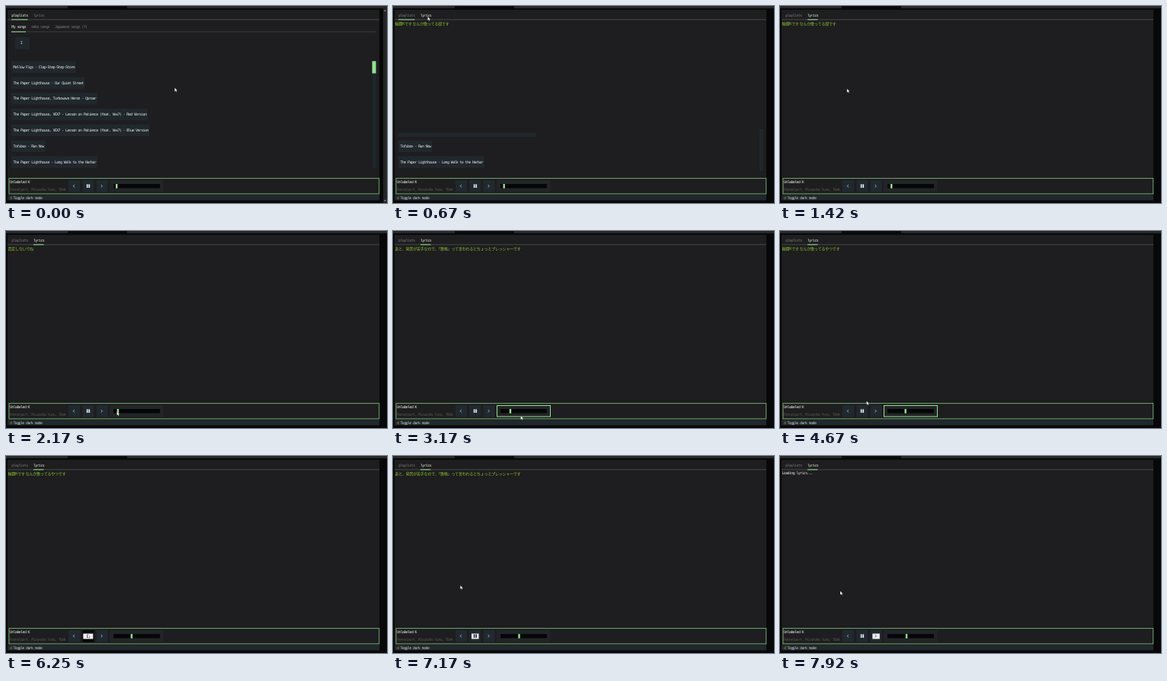
Write an HTML page with a canvas that moves like this. It is 500 px wide and 259 px high and loops after 8 s.

```html
<!DOCTYPE html>
<html lang="en">
<head>
<meta charset="utf-8">
<title>Terminal music player</title>
<style>
html, body { margin: 0; width: 100%; height: 100%; overflow: hidden; background: #080808; }
canvas { display: block; }
</style>
</head>
<body>
<canvas id="stage" width="500" height="259"></canvas>
<script>
const ctx = document.getElementById('stage').getContext('2d');
const LOOP = 8000, FRAME = 1000 / 12;
const BG = '#1e1d1f', BOX = '#20282d', GREEN = '#8ee58e', WHITE = '#e8e8e8', GRAY = '#77777a';
const CELL = 2.36;

// Moments of user actions, in ms
const OPEN_LYRICS = 660, FOCUS_SLIDER = 2250, PAUSE = 4900, RESUME = 6330, NEXT = 7410;

const BAND = 'The Paper Lighthouse';
const SONGS = [
  'Mellow Figs - Clap-Step-Step-Storm',
  BAND + ' - Our Quiet Street',
  BAND + ', Turbowave Heron - Uproar',
  BAND + ', VEX7 - Lesson on Patience (feat. Vex7) - Red Version',
  BAND + ', VEX7 - Lesson on Patience (feat. Vex7) - Blue Version',
  'Tofubox - Run Now',
  BAND + ' - Long Walk to the Harbor',
];

const INTRO = '無題Kです なんか歌ってるやつです';
const PRESSURE = 'あと、発音が苦手なので、「歌唱」って言われるとちょっとプレッシャーです';
const LYRICS = [
  [0, '無題Kです なんか歌ってる奴です'], [1920, '否定しないでね'],
  [2920, PRESSURE], [3750, INTRO], [RESUME, PRESSURE], [NEXT, 'Loading lyrics...'],
];

const SPOT = {
  list: [221.3, 107.5], lyricsTab: [45.5, 14], slider: [145.5, 237.5], belowSlider: [167.5, 243],
  abovePause: [113.5, 223.5], pause: [107, 234], next: [125, 235], rest: [79, 177.5],
};
// Pointer trips; "bow" bends the path sideways at its middle.
const TRIPS = [
  { from: 80, to: 500, goal: SPOT.lyricsTab },
  { from: 1080, to: 1830, goal: SPOT.slider },
  { from: 2420, to: 2580, goal: SPOT.belowSlider },
  { from: 3750, to: 4500, goal: SPOT.abovePause, bow: [150, 8] },
  { from: 4670, to: PAUSE, goal: SPOT.pause },
  { from: 5420, to: 6170, goal: SPOT.pause, bow: [-95, -208] },
  { from: 6500, to: 7330, goal: SPOT.next, bow: [-112, -208] },
  { from: 7420, to: 7830, goal: SPOT.rest },
];

const clamp = (v, lo, hi) => Math.min(hi, Math.max(lo, v));
const progress = (t, from, to) => clamp((t - from) / (to - from), 0, 1);
const ease = p => p * p * (3 - 2 * p);

function pointerAt(t) {
  return TRIPS.reduce((pos, { from, to, goal, bow = [0, 0] }) => {
    const p = ease(progress(t, from, to));
    return pos.map((v, i) => v + (goal[i] - v) * p + bow[i] * Math.sin(Math.PI * p));
  }, SPOT.list);
}

// The thumb creeps while playing and jumps with each seek step.
function thumbAt(t) {
  const played = t - clamp(t - PAUSE, 0, RESUME - PAUSE);
  const steps = (t >= 2490 ? 2 : 0) + clamp(Math.floor((t - 3080) / 170), 0, 3);
  return 144 + played * .00075 + steps * 3.2;
}

function rect(x, y, w, h, color) {
  ctx.fillStyle = color;
  ctx.fillRect(x, y, w, h);
}

function outline(x, y, w, h, color) {
  ctx.strokeStyle = color;
  ctx.lineWidth = 1;
  ctx.strokeRect(x, y, w, h);
}

function path(points) {
  ctx.beginPath();
  points.forEach(([x, y]) => ctx.lineTo(x, y));
}

function poly(points, color) {
  path(points);
  ctx.fillStyle = color;
  ctx.fill();
}

function label(text, x, y, color = WHITE) {
  const wide = /[^\x00-\x7f]/.test(text);
  ctx.font = wide ? '5px "Noto Sans CJK JP", "Noto Sans CJK", sans-serif' : '5px "DejaVu Sans Mono", monospace';
  ctx.letterSpacing = wide ? '-0.2px' : `${CELL - 5 * .602}px`;
  ctx.fillStyle = color;
  ctx.fillText(text, x, y);
}

function drawChrome(t) {
  rect(0, 0, 500, 259, '#080808');
  rect(0, 0, 500, 3, '#29292b');
  rect(81, 0, 78, 3, '#0b0b0c');
  rect(2, 5, 488, 250, BG);
  rect(2, 248.5, 488, 7, BOX);
  label('d', 5, 252.4, '#b58a35');
  label('Toggle dark mode', 9.5, 252.4, '#c4c8ca');
  if (t < 160) {
    rect(495, 3, 5, 256, '#252525');
    poly([[496, 7], [497.5, 5], [499, 7]], '#8a8a8a');
    poly([[496, 255], [497.5, 257], [499, 255]], '#8a8a8a');
  }
}

function drawTabs(t) {
  const onLyrics = t >= OPEN_LYRICS;
  label('playlists', 7.3, 12.7, onLyrics ? GRAY : WHITE);
  label('lyrics', 36, 12.7, onLyrics ? WHITE : GRAY);
  rect(2, 17.4, 488, 1, '#48494b');
  const p = progress(t, 670, 820);
  rect(7 + 29 * p, 17.4, 21.5 - 8 * p, 1, GREEN);
}

function drawPlaylists() {
  label('My songs', 7.3, 28.2);
  label('neko songs', 33.3, 28.2, GRAY);
  label('Japanese songs (?)', 64, 28.2, GRAY);
  rect(7, 33.4, 479, 1, '#3c3d3f');
  rect(7, 33.4, 19, 1, GREEN);
  rect(12, 41, 19, 16, BOX);
  label('I', 18.7, 49);
  drawSongs();
  rect(481, 73, 5, 140, '#1f272c');
  rect(480.5, 72.5, 5, 16, GREEN);
}

function drawSongs() {
  SONGS.forEach((song, i) => {
    const y = 72.5 + i * 20.8;
    rect(7, y, song.length * CELL + 4.3, 15.5, BOX);
    label(song, 9.6, y + 8);
  });
}

// The list is wiped from the top while the lyrics page opens.
function drawLeftovers(t) {
  const top = t < 740 ? 173 : 196;
  ctx.save();
  ctx.beginPath();
  ctx.rect(2, top, 488, 50);
  ctx.clip();
  drawSongs();
  ctx.restore();
  if (t < 740) rect(7, 166.5, 181, 5.5, BOX);
  rect(481, top - 11, 5, 228 - top, '#20272b');
}

function drawLyrics(t) {
  const line = LYRICS.filter(l => l[0] <= t).pop()[1];
  label(line, 2.5, 22.8, t >= NEXT ? WHITE : '#8fc92b');
}

function drawChevron(x, y, dir, color) {
  path([[x - dir, y - 1.8], [x + dir * .8, y], [x - dir, y + 1.8]]);
  ctx.strokeStyle = color;
  ctx.lineWidth = .8;
  ctx.stroke();
}

function drawButton(x, icon, focused) {
  const playing = icon !== 'play';
  rect(x, 229, 15, 15.5, playing ? '#20292f' : '#060708');
  const c = x + 7.5, ink = focused ? '#303438' : WHITE;
  if (focused) {
    const w = playing ? 9.5 : 13;
    rect(c - w / 2, 233.5, w, 7, '#f0f0f0');
  }
  if (icon === 'pause') {
    rect(c - 2, 234.3, 1.7, 4.7, ink);
    rect(c + .6, 234.3, 1.7, 4.7, ink);
  } else if (icon === 'play') {
    poly([[c - 1.5, 234.7], [c + 2, 237], [c - 1.5, 239.3]], ink);
  } else {
    drawChevron(c - .5, 236.7, icon === 'next' ? 1 : -1, focused ? ink : '#c6cacc');
  }
}

function drawPlayer(t) {
  outline(4, 226.6, 485.7, 20.3, '#6caa6c');
  label('Unlabeled K', 5, 231.8);
  label('Fennelport, Mizunoha Yuno, TOmA', 5, 241.6, '#57544e');
  const paused = t >= PAUSE && t < RESUME;
  const nextFocused = t >= NEXT;
  drawButton(82, 'previous', false);
  drawButton(100.3, paused ? 'play' : 'pause', t >= PAUSE && !nextFocused);
  drawButton(118.6, 'next', nextFocused);
  rect(136, 229, 70.5, 15.5, '#232427');
  rect(141, 234, 61, 5.5, '#050607');
  rect(thumbAt(t), 234, 2.4, 5.7, GREEN);
  if (t >= FOCUS_SLIDER && t < PAUSE) outline(136.5, 229.5, 70, 14.5, GREEN);
}

function drawPointer(t) {
  const [x, y] = pointerAt(t);
  ctx.save();
  ctx.translate(x, y);
  poly([[0, 0], [0, 5], [1.2, 4], [2, 5.7], [2.9, 5.3], [2.1, 3.7], [3.6, 3.6]], '#fff');
  ctx.closePath();
  ctx.strokeStyle = 'rgba(0,0,0,.6)';
  ctx.lineWidth = .4;
  ctx.stroke();
  ctx.restore();
}

function draw(now) {
  const t = Math.floor((now % LOOP) / FRAME + .05) * FRAME;
  ctx.textBaseline = 'middle';
  drawChrome(t);
  drawTabs(t);
  if (t < OPEN_LYRICS) {
    drawPlaylists();
  } else {
    if (t < 820) drawLeftovers(t);
    drawLyrics(t);
  }
  drawPlayer(t);
  drawPointer(t);
}

const start = performance.now();
function tick() {
  draw(performance.now() - start);
  requestAnimationFrame(tick);
}
tick();
</script>
</body>
</html>
```
